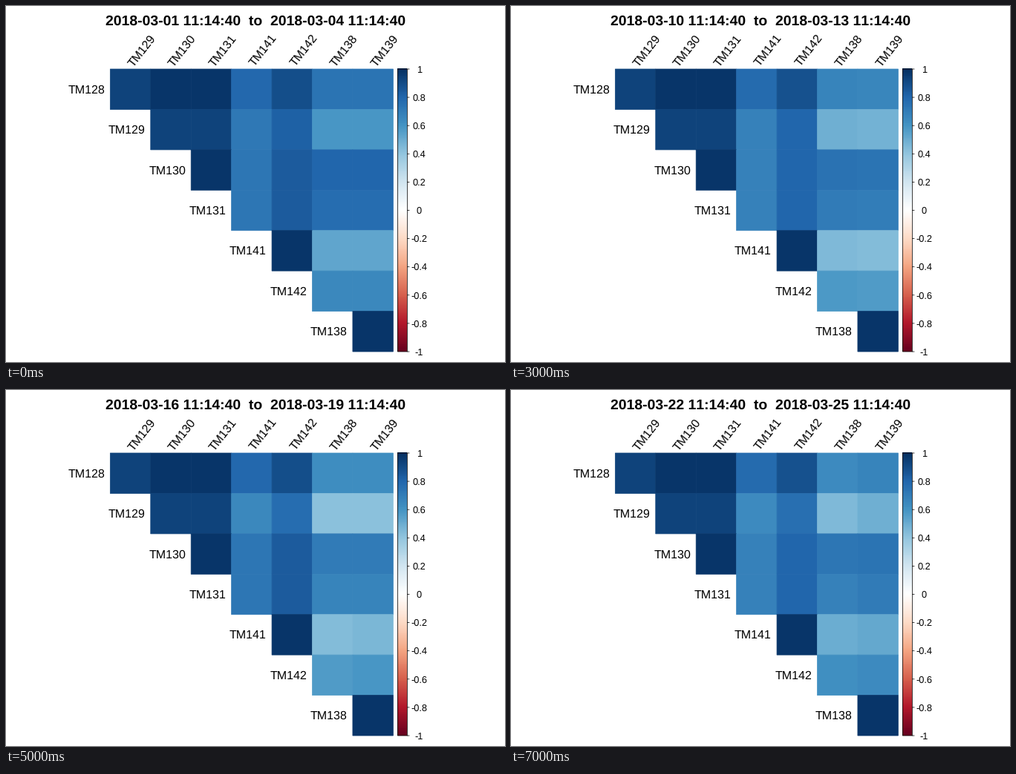
Animation of 672x480 px, one loop 8000 ms. Source, as a matplotlib script:

```python
import math

import numpy as np
import matplotlib.pyplot as plt
from matplotlib.animation import FuncAnimation
from matplotlib.colors import LinearSegmentedColormap
from matplotlib.patches import Rectangle

plt.rcParams.update({
    "font.family": "Liberation Sans",
    "text.hinting": "none",
    "text.kerning_factor": 6,
})

W, H, DPI = 672, 480, 96
STEPS = 8
LEFT, TOP, CELL = 140.35, 85, 54.43
BAR_L, BAR_R = 527.4, 540.4
BAR_H = 7 * CELL
THIN = 0.75 * 72 / DPI

# Sensors fall into three groups; members of one group differ only by noise.
GROUP = {"TM128": "A", "TM129": "A", "TM130": "A", "TM131": "A",
         "TM141": "B", "TM142": "B", "TM138": "C", "TM139": "C"}
NAMES = list(GROUP)
NOISE = {"TM129": 0.06}

# Link of a sensor to another group: start, depth of the dip, period in steps.
LINK = {
    ("TM128", "B"): (0.78, 0.01, 5),
    ("TM129", "B"): (0.71, 0.08, 14),
    ("TM130", "B"): (0.725, 0.055, 5),
    ("TM131", "B"): (0.725, 0.055, 5),
    ("TM128", "C"): (0.73, 0.11, 11),
    ("TM129", "C"): (0.585, 0.17, 11),
    ("TM130", "C"): (0.795, 0.09, 11),
    ("TM131", "C"): (0.765, 0.105, 11),
    ("TM141", "C"): (0.52, 0.095, 8.5),
    ("TM142", "C"): (0.64, 0.08, 8.5),
}

RAMP = LinearSegmentedColormap.from_list("corr", [
    "#67001F", "#B2182B", "#D6604D", "#F4A582", "#FDDBC7", "#FFFFFF",
    "#D1E5F0", "#92C5DE", "#4393C3", "#2166AC", "#053061"], N=200)


def correlation(a, b, step):
    if GROUP[a] == GROUP[b]:
        return 1 - NOISE.get(a, 0.015) - NOISE.get(b, 0.015)
    start, depth, period = LINK[a, GROUP[b]]
    if b == "TM142":
        start, depth = start + 0.105, depth * 0.7
    if b == "TM139":
        period -= 1.2
    return start - depth * math.sin(math.pi * step / period) ** 2


def label(x, y, text, px, **kw):
    return ax.text(x, y, text, fontsize=px * 72 / DPI, color="black",
                   va="baseline", **kw)


def title_text(step):
    day = 1 + 3 * step
    return f"2018-03-{day:02d} 11:14:40  to  2018-03-{day + 3:02d} 11:14:40"


fig = plt.figure(figsize=(W / DPI, H / DPI), dpi=DPI, facecolor="white")
ax = fig.add_axes([0, 0, 1, 1])
ax.axis("off")

# Colour key
ax.imshow(np.linspace(1, -1, 200)[:, None], cmap=RAMP, vmin=-1, vmax=1,
          extent=(BAR_L, BAR_R, TOP + BAR_H, TOP), aspect="auto",
          interpolation="nearest")
ax.set_xlim(0, W)
ax.set_ylim(H, 0)
ax.add_patch(Rectangle((BAR_L, TOP), BAR_R - BAR_L, BAR_H, fill=False,
                       ec="black", lw=THIN, snap=False, zorder=3))
for i in range(11):
    y = TOP + BAR_H * i / 10
    ax.plot([BAR_R, BAR_R + 2.6], [y, y], color="black", lw=THIN, snap=False)
    label(556.3, y + 4.6, f"{(5 - i) / 5:g}", 12.8, ha="center")

# Upper triangle of the matrix
title = label(W / 2, 26, title_text(0), 19.4, ha="center", weight="bold")
cells = []
for r, a in enumerate(NAMES[:-1]):
    x, y = LEFT + r * CELL, TOP + r * CELL
    label(x - 7.2, y + CELL / 2 + 5.4, a, 16, ha="right")
    label(x + CELL / 2 + 4, 82.5, NAMES[r + 1], 16, ha="left",
          rotation=52, rotation_mode="anchor")
    for c, b in enumerate(NAMES[r + 1:], start=r):
        patch = Rectangle((LEFT + c * CELL, y), CELL, CELL, lw=THIN,
                          snap=False)
        ax.add_patch(patch)
        cells.append((patch, a, b))


def draw(step):
    title.set_text(title_text(step))
    for patch, a, b in cells:
        patch.set_color(RAMP((correlation(a, b, step) + 1) / 2))
    return [title] + [patch for patch, _, _ in cells]


anim = FuncAnimation(fig, draw, frames=STEPS, interval=1000, repeat=True,
                     repeat_delay=0)
plt.show()
```
